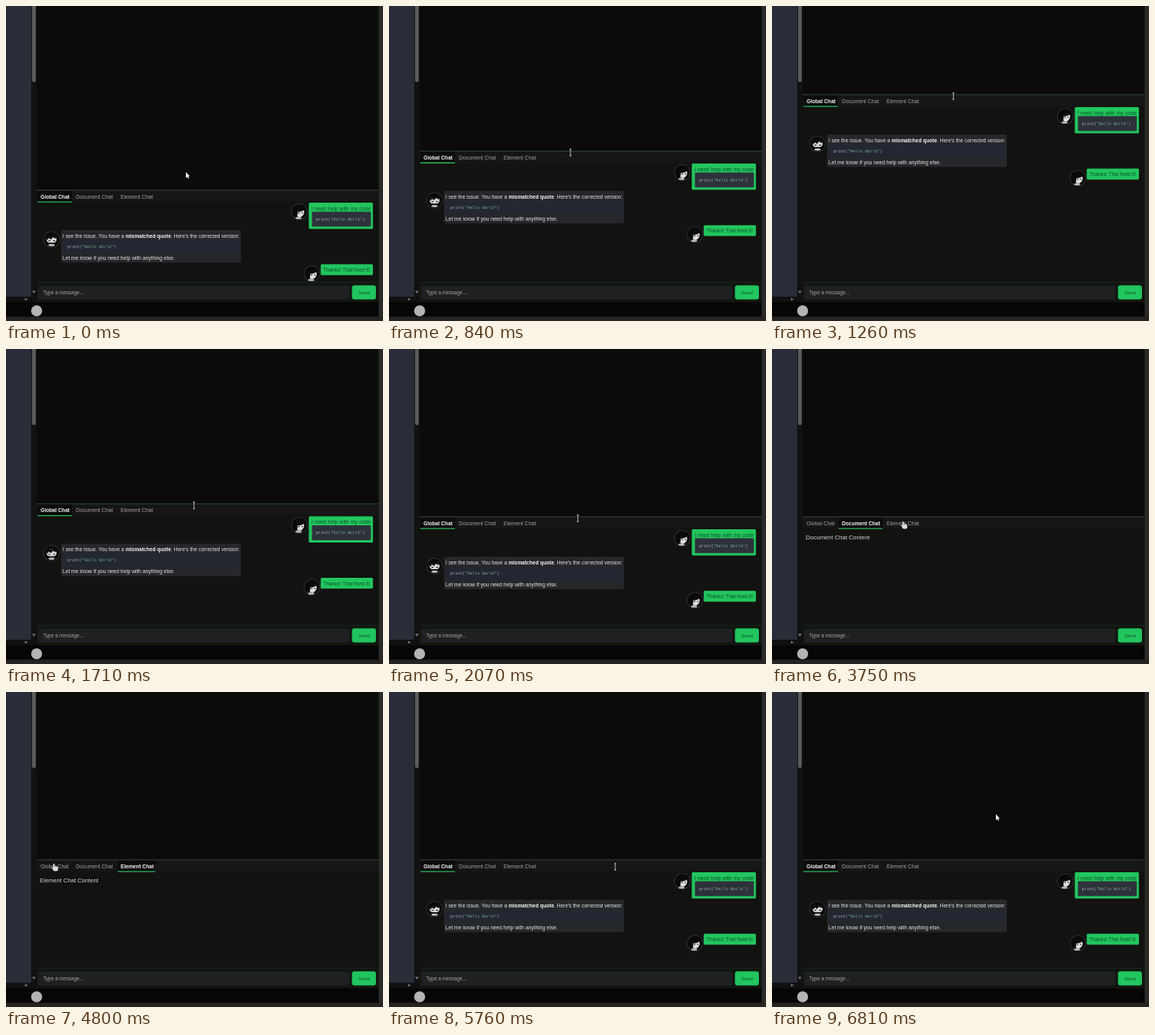
These frames come from a looping animation (480 by 402 pixels, 6.84 s). An HTML page with a canvas:

```html
<!DOCTYPE html>
<html lang="en">
<head>
<meta charset="utf-8">
<title>Chat panel</title>
<style>
  html, body { margin: 0; width: 100%; height: 100%; overflow: hidden; background: #1a1a1a; }
  canvas { display: block; width: 480px; height: 402px; filter: blur(0.45px); }
</style>
</head>
<body>
<canvas id="stage"></canvas>
<script>
const W = 480, H = 402, LOOP = 6840;
const SANS = '"Liberation Sans", Arial, sans-serif';
const MONO = '"Liberation Mono", monospace';
const GREEN = '#22c55e', GREEN_INK = '#0b5529';
const canvas = document.getElementById('stage');
const ratio = window.devicePixelRatio || 1;
canvas.width = W * ratio;
canvas.height = H * ratio;
const ctx = canvas.getContext('2d');

// Keyframes: [time, value, ...]
const panelKeys = [[0, 235], [560, 235], [1200, 113], [1350, 113], [1836, 214]];
const cursorKeys = [
  [60, 229, 212], [480, 231, 237], [560, 231, 237], [1200, 231, 115], [1350, 231, 115],
  [1836, 241, 216], [2520, 239, 216], [2850, 239, 216], [3250, 112, 223], [3450, 112, 223],
  [3720, 168, 224], [4100, 168, 224], [4650, 62, 223], [5100, 62, 223],
  [5680, 288, 223], [5850, 288, 223], [6450, 285, 156]
];
const tabs = [
  { name: 'Global Chat', x: 44, left: 40, right: 84 },
  { name: 'Document Chat', x: 89, left: 85, right: 141 },
  { name: 'Element Chat', x: 146, left: 142, right: 190 }
];
const clicks = [[0, 0], [3330, 1], [3920, 2], [4820, 0]];

function at(keys, t) {
  const i = keys.findIndex(k => k[0] > t);
  if (i === 0) return keys[0].slice(1);
  if (i < 0) return keys[keys.length - 1].slice(1);
  const a = keys[i - 1], b = keys[i];
  const u = (t - a[0]) / (b[0] - a[0]);
  const s = u * u * (3 - 2 * u);
  return a.slice(1).map((v, n) => v + (b[n + 1] - v) * s);
}

function box(x, y, w, h, color, r = 0) {
  ctx.fillStyle = color;
  ctx.beginPath();
  ctx.roundRect(x, y, w, h, r);
  ctx.fill();
}

function dot(x, y, rx, ry, color, turn = 0) {
  ctx.fillStyle = color;
  ctx.beginPath();
  ctx.ellipse(x, y, rx, ry, turn, 0, Math.PI * 2);
  ctx.fill();
}

function poly(points, color) {
  ctx.fillStyle = color;
  ctx.beginPath();
  points.forEach(([x, y]) => ctx.lineTo(x, y));
  ctx.closePath();
  ctx.fill();
}

// Draws text centred on y and returns its right edge.
function text(str, x, y, color, size = 6.65, weight = '', family = SANS) {
  ctx.font = `${weight} ${size}px ${family}`;
  ctx.textBaseline = 'middle';
  ctx.fillStyle = color;
  ctx.fillText(str, x, y);
  return x + ctx.measureText(str).width;
}

function code(x, y, close) {
  const put = (s, px, color) => text(s, px, y, color, 5.2, '', MONO);
  let px = put('print(', x, '#a3abb2');
  px = put('"Hello World' + close, px, '#74a982');
  put(')', px, '#a3abb2');
}

function disc(x, y) {
  dot(x, y, 10.8, 10.8, '#242424');
  dot(x, y, 9.3, 9.3, '#090909');
}

function userAvatar(x, y) {
  disc(x, y);
  dot(x + 1, y + 1, 5, 6, '#dedede', 0.3);
  dot(x + 1, y - 4, 6.5, 4, '#0a0a0a', -0.3);
  dot(x - 4.5, y + 1, 2.5, 5, '#0a0a0a');
  box(x - 1, y + 1, 1.5, 1.3, '#222');
  box(x + 3, y + 1, 1.5, 1.3, '#222');
  dot(x - 1, y + 8, 4, 1.6, '#b8b8b8');
}

function botAvatar(x, y) {
  disc(x, y);
  dot(x, y, 6.5, 5, '#d6d6d6');
  poly([[x - 7, y - 5], [x + 7, y - 5], [x + 5, y - 1], [x + 2, y - 3], [x - 1, y], [x - 3, y - 2], [x - 6, y + 1]], '#101010');
  box(x - 4, y + 1, 2.5, 1.2, '#222');
  box(x + 2, y + 1, 2.5, 1.2, '#222');
  box(x - 4, y + 4, 8, 1.5, '#111');
  dot(x, y + 7.2, 4, 1.4, '#c4c4c4');
}

function messages(p) {
  userAvatar(373.5, p + 27.5);
  box(385.5, p + 16, 81.7, 33.5, GREEN, 1.5);
  text('I need help with my code', 389, p + 24.2, GREEN_INK, 6.8);
  box(389.5, p + 27.5, 75, 19, '#2d323a', 1);
  code(394.5, p + 37.7, "'");

  botAvatar(58, p + 63);
  box(70, p + 51, 229, 41.5, '#26272a', 2);
  box(71.5, p + 64, 226, 15.5, '#222732', 1);
  const ink = '#e2e4e6', y = p + 59.2;
  let x = text('I see the issue. You have a ', 72, y, ink, 6.56);
  x = text('mismatched quote', x, y, '#f4f5f6', 6.56, 'bold');
  text(". Here's the corrected version:", x, y, ink, 6.56);
  code(78, p + 72.7, '"');
  text('Let me know if you need help with anything else.', 72, p + 87, ink);

  userAvatar(389.5, p + 106.5);
  box(400.7, p + 94.6, 66.5, 13.8, GREEN, 1.5);
  text('Thanks! That fixed it!', 404, p + 102.6, GREEN_INK, 6.4);
}

function panel(p, active) {
  box(39, p, 436, 378 - p, '#121210');
  box(39, p, 436, 15, '#151615');
  box(39, p - 0.4, 436, 1.2, '#2a3a2f');
  tabs.forEach((tab, i) => {
    const on = i === active;
    if (on) {
      box(tab.left, p + 1, tab.right - tab.left, 14, '#0b0c0b');
      box(tab.left, p + 14.5, tab.right - tab.left, 1.3, '#28b65a');
    }
    text(tab.name, tab.x, p + 9, on ? '#f4f4f4' : '#a0a0a0', on ? 6.6 : 6.8, on ? 'bold' : '');
  });
  ctx.save();
  ctx.beginPath();
  ctx.rect(39, p + 15, 436, 337 - p);
  ctx.clip();
  if (active === 0) messages(p);
  else text(tabs[active].name + ' Content', 43, p + 26.7, '#d4d4d4', 7.6);
  ctx.restore();

  box(39, 352, 436, 26, '#111611');
  box(39, 352, 436, 1, '#17261a');
  box(41, 357, 396, 17.5, '#1f2022', 2);
  text('Type a message...', 47.3, 366.6, '#a2a2a2', 6.3);
  box(440.5, 356.5, 30.5, 18, GREEN, 3);
  text('Send', 448.8, 366.2, GREEN_INK, 6.2);
}

function frameArea() {
  box(0, 0, W, H, '#0b0b09');
  box(0, 0, 32, 371, '#2a2d37');
  box(32, 0, 7, 378, '#111211');
  box(33.1, -4, 4.8, 101, '#5c5c5a', 2);
  box(0, 371, 39, 7, '#101010');
  box(0, 378, 475, 18, '#060606');
}

function edges() {
  poly([[33, 363.5], [38, 363.5], [35.5, 367]], '#707070');
  poly([[24, 372.5], [28, 374.2], [24, 376]], '#707070');
  dot(39, 389, 7, 7, '#b4b4b4');
  box(474.5, 0, 5.5, 397, '#292a29');
  box(0, 396.5, W, 5.5, '#272322');
}

function arrow(x, y) {
  poly([[x, y], [x, y + 7.5], [x + 1.8, y + 6], [x + 3, y + 8.3], [x + 4.2, y + 7.7], [x + 3, y + 5.4], [x + 5, y + 5.2]], '#f4f4f4');
}

function resizer(x, y) {
  const ink = '#b4b4b4';
  box(x - 0.5, y - 4, 1, 8, ink);
  poly([[x - 1.5, y - 3.5], [x, y - 5.5], [x + 1.5, y - 3.5]], ink);
  poly([[x - 1.5, y + 3.5], [x, y + 5.5], [x + 1.5, y + 3.5]], ink);
}

function hand(x, y) {
  box(x - 2, y - 4, 1.8, 7, '#d9d9d9', 0.9);
  box(x - 2, y - 0.5, 6.2, 6, '#d9d9d9', 1.8);
  poly([[x - 4, y + 0.5], [x - 2, y + 1], [x, y + 5], [x - 1.5, y + 5]], '#d9d9d9');
}

function cursor(x, y, p) {
  const below = y - p;
  if (x < 190 && below > 4 && below < 16) hand(x, y);
  else if (below > -3 && below < 12) resizer(x, y);
  else arrow(x, y);
}

function draw(t) {
  ctx.setTransform(ratio, 0, 0, ratio, 0, 0);
  const [p] = at(panelKeys, t);
  const [x, y] = at(cursorKeys, t);
  const active = clicks.filter(c => c[0] <= t).pop()[1];
  frameArea();
  panel(p, active);
  edges();
  cursor(x, y, p);
}

const start = performance.now();
function tick() {
  draw((performance.now() - start) % LOOP);
  requestAnimationFrame(tick);
}
tick();
</script>
</body>
</html>
```
